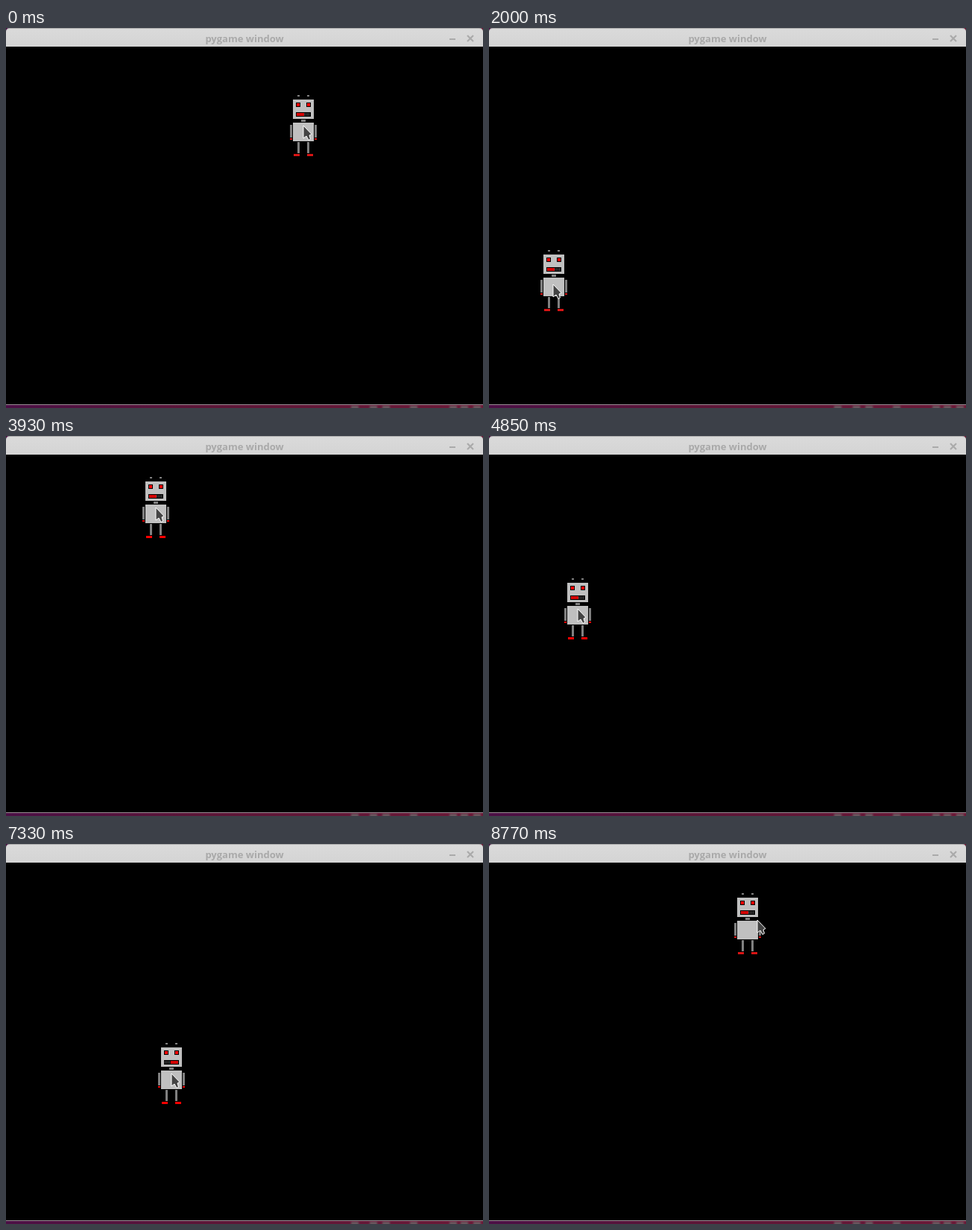
Write an HTML page that moves like this. It is 640 by 510 pixels and loops after 8790 ms.

```html
<!DOCTYPE html>
<html lang="en">
<head>
<meta charset="utf-8">
<title>pygame window</title>
<style>
  html, body { margin: 0; width: 640px; height: 510px; overflow: hidden; background: #000; }
  svg { display: block; }
  .crisp { shape-rendering: crispEdges; }
</style>
</head>
<body>
<svg width="640" height="510" viewBox="0 0 640 510">
  <defs>
    <linearGradient id="desk">
      <stop offset="0" stop-color="#4c1046"/>
      <stop offset=".4" stop-color="#5c1638"/>
      <stop offset="1" stop-color="#6c1a38"/>
    </linearGradient>
    <linearGradient id="bar" x2="0" y2="1">
      <stop offset="0" stop-color="#dadada"/>
      <stop offset="1" stop-color="#d4d4d4"/>
    </linearGradient>
    <filter id="soft"><feGaussianBlur stdDeviation="1.2"/></filter>
  </defs>

  <rect width="640" height="510" fill="url(#desk)"/>
  <g id="smudges" fill="#6c5c62" filter="url(#soft)"></g>
  <path d="M0 25V5Q0 0 5 0H635Q640 0 640 5V25Z" fill="#aaa"/>
  <path d="M0 25V6Q0 1 5 1H635Q640 1 640 6V25Z" fill="url(#bar)"/>
  <text x="320" y="19" text-anchor="middle" fill="#a9a9a9"
    style="font: bold 13px 'Open Sans', 'Noto Sans', sans-serif">pygame window</text>
  <path d="M595 15H603M619 10L627 18M627 10L619 18" stroke="#aaa" stroke-width="2.2" fill="none"/>
  <rect class="crisp" y="25" width="640" height="480"/>
  <rect class="crisp" y="505" width="640" height="1" fill="#9a8c94"/>

  <g id="robot" class="crisp"></g>
  <path id="cursor" d="M0 0V17L4 14L7 19.5L9.5 18L8 13L11 11.5Z"
    fill="#444" stroke="#fff" stroke-width="1" stroke-linejoin="round"/>
</svg>
<script>
const LOOP = 8790, STEP = 40;
const $ = id => document.getElementById(id);

function rect(parent, x, y, width, height, fill) {
  const r = document.createElementNS('http://www.w3.org/2000/svg', 'rect');
  const attrs = { x, y, width, height };
  if (fill) attrs.fill = fill;
  for (const name in attrs) r.setAttribute(name, attrs[name]);
  parent.append(r);
  return r;
}

for (const x of [463, 488, 505, 542, 595, 610, 627]) rect($('smudges'), x, 507, 10, 4);

// Robot, drawn from its top left corner
const robot = $('robot'), GREY = '#808080', LIGHT = '#c0c0c0', RED = '#f00';
const lamps = [], teeth = [];
rect(robot, 4, 6, 28, 26, LIGHT);
rect(robot, 15, 33, 6, 3, GREY);
rect(robot, 4, 37, 28, 25, LIGHT);
for (const side of [0, 1]) {
  const leg = 10 + 13 * side, arm = 33 * side, eye = 8 + 14 * side;
  rect(robot, leg, 0, 3, 2, GREY);
  rect(robot, eye, 10, 6, 6, '#000');
  rect(robot, eye + 1, 11, 4, 4, RED);
  rect(robot, arm, 40, 3, 17, GREY);
  rect(robot, leg, 63, 3, 15, GREY);
  lamps.push(rect(robot, arm, 58, 3, 2), rect(robot, 5 + 18 * side, 79, 8, 3));
}
rect(robot, 8, 23, 20, 6, '#000');
for (let i = 0; i < 18; i++) teeth.push(rect(robot, 9 + i, 24, 1, 4));

// Monotone cubic curve through [time, value] knots
function curve(knots) {
  const last = knots.length - 1;
  const rise = i => (knots[i + 1][1] - knots[i][1]) / (knots[i + 1][0] - knots[i][0]);
  const slope = knots.map((_, i) => {
    if (i === 0) return 0;
    if (i === last) return rise(i - 1);
    const a = rise(i - 1), b = rise(i);
    return a * b > 0 ? 2 * a * b / (a + b) : 0;
  });
  return t => {
    if (t <= knots[0][0]) return knots[0][1];
    let i = 0;
    while (i < last - 1 && t > knots[i + 1][0]) i++;
    const [t0, v0] = knots[i], [t1, v1] = knots[i + 1];
    const h = t1 - t0, u = Math.min(1, (t - t0) / h), w = 1 - u;
    return w * w * ((1 + 2 * u) * v0 + u * h * slope[i])
      + u * u * ((3 - 2 * u) * v1 - w * h * slope[i + 1]);
  };
}

const pathX = curve([
  [120, 381], [1000, 163], [1880, 79], [2000, 69], [2760, 53], [3200, 31],
  [3650, 67], [3930, 183], [4130, 209], [4530, 166], [4850, 101], [5010, 93],
  [5410, 155], [6210, 352], [6290, 352], [7170, 204], [7330, 204], [8050, 319],
  [8450, 305], [8770, 329], [8798, 342]
]);
const pathY = curve([
  [120, 90], [1000, 139], [1880, 274], [2000, 298], [2300, 338], [2760, 268],
  [3650, 92], [3930, 55], [4010, 52], [4530, 163], [4850, 191], [5410, 284],
  [5650, 322], [6210, 162], [6290, 150], [6600, 116], [7170, 232], [7330, 267],
  [7650, 316], [8050, 266], [8770, 66], [8798, 61]
]);

function place(el, t, dx, dy) {
  const x = Math.round(pathX(t)) + dx, y = Math.round(pathY(t)) + dy;
  el.setAttribute('transform', `translate(${x} ${y})`);
}

function draw(time) {
  const shift = time < 3210 ? 0 : 10;
  const k = Math.floor((time - shift) / STEP);
  const t = k * STEP + shift;
  const lead = k % 13 === 11 ? 28 : 0; // the pointer runs ahead now and then
  place(robot, t, 0, 0);
  place($('cursor'), t + lead, 18, 41);

  const bright = k % 13 > 0 && k % 13 < 8;
  const right = k % 14 > 0 && k % 14 < 8;
  for (const lamp of lamps) lamp.setAttribute('fill', bright ? RED : '#d81414');
  teeth.forEach((tooth, i) => {
    const lit = right ? i > 7 : i < 10;
    const gap = i % 2 === 1;
    tooth.setAttribute('fill', lit ? (gap ? '#a00' : RED) : (gap ? '#000' : '#484848'));
  });
}

const start = performance.now();
function tick() {
  draw((performance.now() - start) % LOOP);
  requestAnimationFrame(tick);
}
tick();
</script>
</body>
</html>
```
